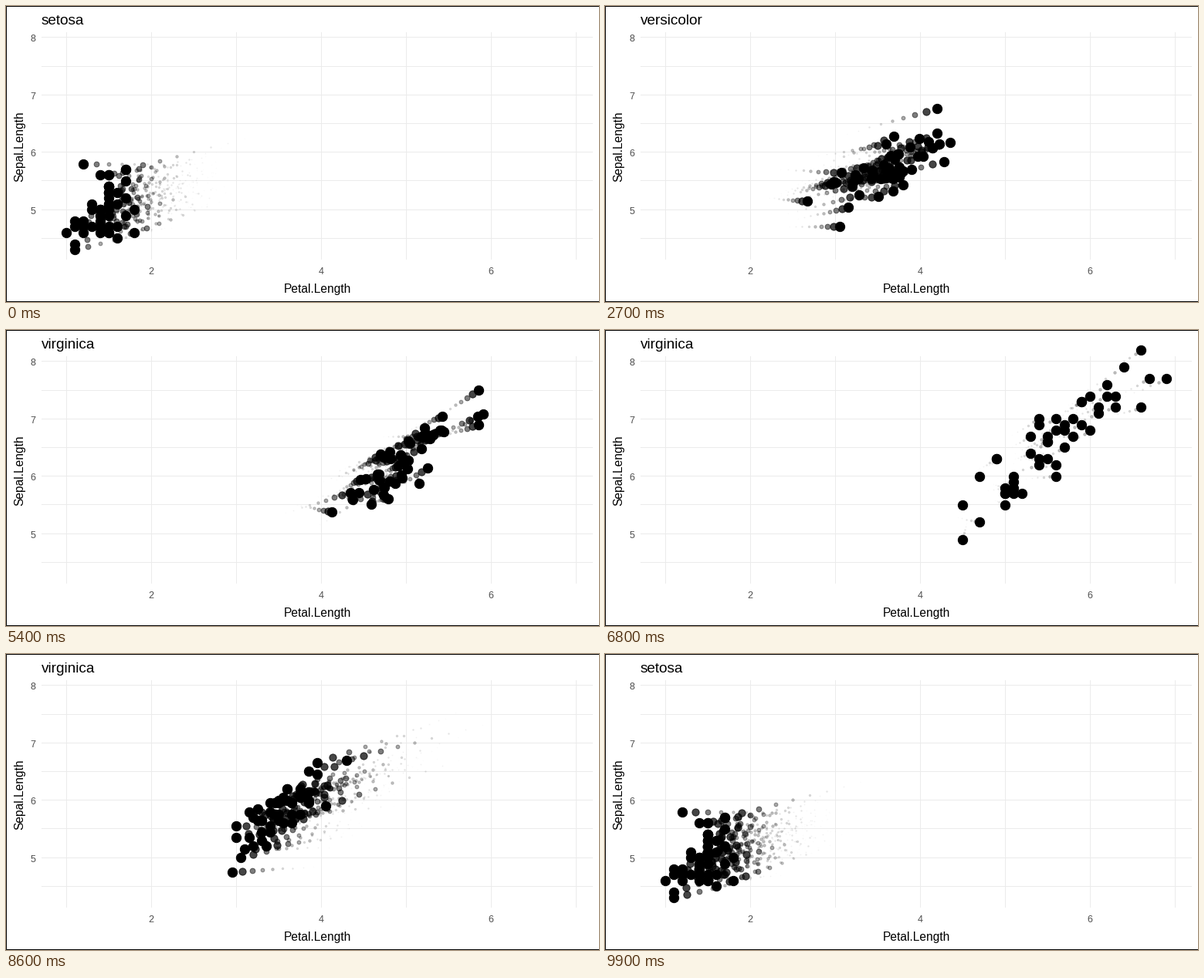
A matplotlib script that plays this animation: 768 by 384 pixels, repeating every 10 s.

```python
import numpy as np
import matplotlib.pyplot as plt
from matplotlib.animation import FuncAnimation

plt.rcParams["font.family"] = ["Liberation Sans", "DejaVu Sans"]
W, H, DPI = 768, 384, 96
PT = 72 / DPI
FRAMES, WAKE, COUNT = 100, 10, 50

# Mean petal and sepal, their spreads, and how strongly they correlate
species = {
    "setosa": (1.46, 5.01, 0.17, 0.35, 0.27),
    "versicolor": (4.26, 5.94, 0.47, 0.51, 0.75),
    "virginica": (5.55, 6.59, 0.55, 0.63, 0.86),
}
names = list(species)

# Outlying flowers: (petal, sepal) in each of the three states
outliers = np.array([
    [(1.4, 4.6), (4.7, 6.3), (4.5, 4.9)],
    [(1.1, 4.3), (4.7, 6.1), (5.0, 5.7)],
    [(1.2, 5.8), (3.6, 5.6), (5.1, 5.8)],
    [(1.7, 5.7), (4.5, 6.2), (6.9, 7.7)],
    [(1.5, 5.4), (3.7, 5.5), (6.4, 7.9)],
    [(1.5, 5.3), (3.0, 5.1), (5.4, 6.2)],
    [(1.0, 4.6), (4.9, 6.3), (6.7, 7.7)],
])
rng = np.random.default_rng(7)


def px(v):
    return 78.2 + 110 * (v - 1)


def py(v):
    return 264.1 + 74.4 * (5 - v)


def cloud(k):
    """Pixel positions of all flowers of species k."""
    petal, sepal, dp, ds, r = species[names[k]]
    z = rng.standard_normal((COUNT - len(outliers), 2))
    z = np.clip((z - z.mean(0)) / z.std(0), -1.9, 1.9)
    x = petal + dp * z[:, 0]
    y = sepal + ds * (r * z[:, 0] + np.sqrt(1 - r * r) * z[:, 1])
    pts = np.vstack([outliers[:, k], np.column_stack([x, y]).round(1)])
    return np.column_stack([px(pts[:, 0]), py(pts[:, 1])])


states = [cloud(k) for k in range(3)]
moves = [(6, 33), (40, 65), (73, 99)]  # departure and arrival


def pose(i):
    """Flower positions and title at frame i."""
    i %= FRAMES
    for k, (start, end) in enumerate(moves):
        if i < end:
            p = max(0, (i - start) / (end - start))
            nxt = (k + 1) % 3
            pos = states[k] + (states[nxt] - states[k]) * p
            return pos, names[nxt if p > 0.5 else k]
    return states[0], names[0]


fig = plt.figure(figsize=(W / DPI, H / DPI), dpi=DPI, facecolor="white")
ax = fig.add_axes([0, 0, 1, 1])
ax.set_xlim(0, W)
ax.set_ylim(H, 0)
ax.axis("off")


def line(x, y, color):
    ax.plot(x, y, color=color, lw=PT, snap=False, solid_capstyle="butt",
            solid_joinstyle="miter", zorder=1)


def label(x, y, s, size, **kw):
    return ax.text(x, y, s, fontsize=size * PT, va="baseline",
                   rotation_mode="anchor", **kw)


for v in range(1, 8):
    x = np.floor(px(v)) + 0.5
    line([x, x], [34, 329], "#ebebeb")
for v in np.arange(4.5, 8.1, 0.5):
    y = np.floor(py(v)) + 0.5
    line([46, 760], [y, y], "#ebebeb")
line([W, 0.5, 0.5, W], [0.5, 0.5, H - 0.5, H - 0.5], "black")

for v in (2, 4, 6):
    label(px(v) - 0.3, 348, str(v), 12.5, ha="center", color="#4d4d4d")
for v in (5, 6, 7, 8):
    label(38.3, py(v) + 5.5, str(v), 12.5, ha="right", color="#4d4d4d")
label(403, 372, "Petal.Length", 15.5, ha="center")
label(22.5, 182, "Sepal.Length", 15.5, ha="center", rotation=90)
title = label(45.5, 24, "", 19, ha="left")

# Oldest echo first; size and opacity fall off with the cube of age
ages = np.repeat(np.arange(WAKE, -1, -1), COUNT)
fade = (1 - ages / WAKE) ** 3
diameter = 4 * 2.845 * fade + 0.945
ink = np.zeros((len(ages), 4))
ink[:, 3] = fade
dots = ax.scatter(0 * fade, 0 * fade, s=(diameter * PT) ** 2, facecolors=ink,
                  edgecolors=ink, linewidths=PT, zorder=3)


def draw(i):
    trail = np.vstack([pose(i - age)[0] for age in range(WAKE, -1, -1)])
    dots.set_offsets(np.round(trail) + 0.5)
    title.set_text(pose(i)[1])
    return dots, title


anim = FuncAnimation(fig, draw, frames=FRAMES, interval=100, repeat=True,
                     repeat_delay=0, blit=False)
plt.show()
```
